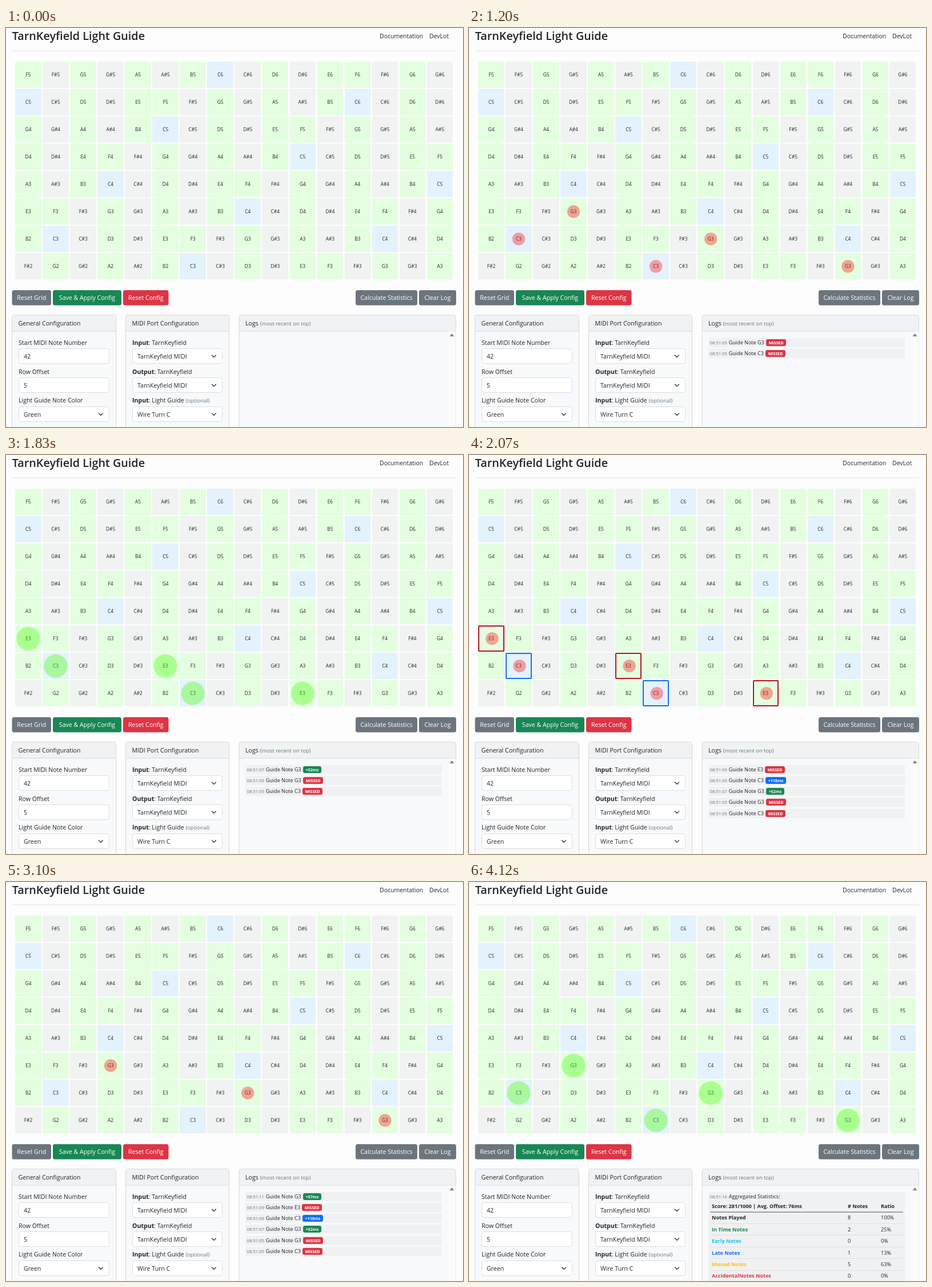
Write an HTML page that moves like this. It is 800 by 700 pixels and loops after 5430 ms.

```html
<!DOCTYPE html>
<html lang="en">
<head>
<meta charset="utf-8">
<title>Light Guide</title>
<style>
  html, body { margin: 0; width: 100%; height: 100%; overflow: hidden; background: #fdfdfd; }
  svg { display: block; width: 800px; height: 700px; font-family: "Open Sans", "Noto Sans", sans-serif; }
</style>
</head>
<body>
<svg id="stage" viewBox="0 0 800 700" xmlns="http://www.w3.org/2000/svg"></svg>
<script>
const NS = 'http://www.w3.org/2000/svg';
const stage = document.getElementById('stage');
const INK = '#212529', MUTED = '#64777d', GREY = '#6c757d';
const GREEN = '#198754', RED = '#dc3545', BLUE = '#0d6efd';
const LOOP = 5430;

function add(parent, tag, attrs, content) {
  const el = document.createElementNS(NS, tag);
  for (const k in attrs) el.setAttribute(k, attrs[k]);
  if (content !== undefined) el.textContent = content;
  parent.appendChild(el);
  return el;
}
const group = (parent) => add(parent, 'g', {});
const rect = (p, x, y, w, h, fill, more) => add(p, 'rect', { x, y, width: w, height: h, fill, ...more });
const text = (p, x, y, str, size = 10.6, fill = INK, more) =>
  add(p, 'text', { x, y, 'font-size': size, fill, ...more }, str);
const aside = (t, str) => add(t, 'tspan', { 'font-size': 9.4, fill: MUTED, dx: 0.6 }, ' ' + str);
const bold = { 'font-weight': 700 };
const middle = { 'text-anchor': 'middle' };
const show = (el, on) => el.setAttribute('visibility', on ? 'visible' : 'hidden');

// Header
text(stage, 10.7, 21, 'TarnKeyfield Light Guide', 19.8, INK, { 'font-weight': 600 });
text(stage, 654, 17.5, 'Documentation', 10.5);
text(stage, 741, 17.5, 'DevLot', 10.5);
rect(stage, 11, 39.5, 777, 1, '#e1e2e3');

// Note grid
const NAMES = ['C', 'C#', 'D', 'D#', 'E', 'F', 'F#', 'G', 'G#', 'A', 'A#', 'B'];
const EDGE = { r: '#b3141e', b: BLUE, g: '#12a82c' };
const PITCH = { C: 48, E: 52, G: 55 };
const STEP = 48.03, SIDE = 45.4;
const marks = [];

function cell(row, col) {
  const midi = 42 + (7 - row) * 5 + col;
  const name = NAMES[midi % 12];
  const fx = 16.2 + STEP * col, fy = 59.1 + STEP * row;
  const x = Math.round(fx), y = Math.round(fy);
  const w = Math.round(fx + SIDE) - x, h = Math.round(fy + SIDE) - y;
  const fill = name === 'C' ? '#e4f2fd' : name.length > 1 ? '#f1f2f2' : '#e4fee0';
  const cx = fx + 22.8, cy = fy + 22.9;
  rect(stage, x, y, w, h, fill, { rx: 1 });
  text(stage, cx, cy + 3.1, name + (Math.floor(midi / 12) - 1), 8.3, INK, middle);
  const key = Object.keys(PITCH).find(k => PITCH[k] === midi);
  if (!key) return;
  const dot = (r, fill, o) => add(stage, 'circle', { cx, cy, r, fill, 'fill-opacity': o });
  marks.push({
    key, cx,
    played: dot(11.2, 'rgb(255,20,20)', 0.38),
    guide: dot(20.6, 'rgb(80,255,20)', 0.4),
    edge: rect(stage, x + 1, y + 1, w - 2, h - 2, 'none', { 'stroke-width': 2, rx: 1 })
  });
}
for (let r = 0; r < 8; r++) for (let c = 0; c < 16; c++) cell(r, c);

// Buttons
function button(x, right, label, fill) {
  rect(stage, x, 460, right - x, 26.6, fill, { rx: 3.5 });
  text(stage, (x + right) / 2, 477.4, label, 10.6, '#fff', middle);
}
button(10.5, 79, 'Reset Grid', GREY);
button(82, 202, 'Save & Apply Config', GREEN);
button(205, 284.6, 'Reset Config', RED);
button(612, 720, 'Calculate Statistics', GREY);
button(723, 788, 'Clear Log', GREY);

// Cards
function card(x, right, title, note) {
  const w = right - x;
  rect(stage, x + .5, 503.5, w - 1, 230, '#f8f9fa', { rx: 4 });
  rect(stage, x + .5, 503.5, w - 1, 28.5, '#f1f2f3', { rx: 4 });
  rect(stage, x, 531.5, w, 1, '#d8d9da');
  rect(stage, x + .5, 503.5, w - 1, 230, 'none', { rx: 4, stroke: '#d8d9da' });
  const t = text(stage, x + 11.5, 522, title);
  if (note) aside(t, note);
}
function field(x, y, w, value, select) {
  rect(stage, x + .5, y + .5, w - 1, 26, '#fff', { rx: 4, stroke: '#dadee2' });
  text(stage, x + 9, y + 17.5, value);
  if (select) add(stage, 'path', {
    d: `M${x + w - 18.6} ${y + 12}l3.5 3.5l3.5 -3.5`, fill: 'none', stroke: '#343a40',
    'stroke-width': 1.3, 'stroke-linecap': 'round', 'stroke-linejoin': 'round'
  });
}
function label(x, y, strong, rest, note) {
  const t = text(stage, x, y, '');
  if (strong) add(t, 'tspan', bold, strong);
  add(t, 'tspan', {}, rest);
  if (note) aside(t, note);
}

card(10, 193, 'General Configuration');
label(22, 556, '', 'Start MIDI Note Number');
field(22, 562, 159, '42');
label(22, 606.7, '', 'Row Offset');
field(22, 613, 159, '5');
label(22, 657.4, '', 'Light Guide Note Color');
field(22, 664, 159, 'Green', true);
label(22, 708, '', 'Played Note Color');

card(209, 391, 'MIDI Port Configuration');
label(221, 556, 'Input', ': TarnKeyfield');
field(221, 562, 158, 'TarnKeyfield MIDI', true);
label(221, 606.7, 'Output', ': TarnKeyfield');
field(221, 613, 158, 'TarnKeyfield MIDI', true);
label(221, 657.4, 'Input', ': Light Guide', '(optional)');
field(221, 664, 158, 'Wire Turn C', true);
label(221, 708, 'Output', ': Light Guide');

card(407.5, 788, 'Logs', '(most recent on top)');
rect(stage, 774, 532.5, 13.5, 170, '#fbfbfb');
add(stage, 'path', { d: 'M776.5 541l4 -5l4 5z', fill: '#a5767b' });

// Log entries, oldest first: second, note, offset
const LOGS = [
  ['05', 'C'], ['05', 'G'], ['07', 'G', 52], ['09', 'C', 118],
  ['09', 'E'], ['11', 'G', 57], ['14', 'C'], ['14', 'G']
];
const BADGE_X = { C: 519, E: 518, G: 520 };
const logTime = (p, y, sec) => text(p, 421.5, y, '08:51:' + sec, 7.7, GREY);

const entries = LOGS.map(([sec, key, ms]) => {
  const g = group(stage);
  const x = BADGE_X[key];
  const w = !ms ? 35 : ms > 99 ? 36 : 32;
  rect(g, 419, 544, 344, 16, '#f0f1f2', { rx: 1 });
  logTime(g, 555.4, sec);
  text(g, 454.7, 555.4, `Guide Note ${key}3`, 9.05);
  rect(g, x, 546, w, 12, !ms ? RED : ms > 99 ? BLUE : GREEN, { rx: 3.3 });
  text(g, x + w / 2, 554.7, ms ? `+${ms}ms` : 'MISSED', 7, '#fff', { ...bold, ...middle });
  return g;
});

// Statistics table
const stats = group(stage);
rect(stats, 419, 544, 344, 160, '#f0f1f2', { rx: 1 });
logTime(stats, 555.4, '16');
text(stats, 454.7, 555.4, 'Aggregated Statistics:', 9.05);
text(stats, 425, 572, 'Score: 281/1000 | Avg. Offset: 76ms', 9.1, INK, bold);
text(stats, 663, 572, '# Notes', 9.1, INK, bold);
text(stats, 721, 572, 'Ratio', 9.1, INK, bold);
rect(stats, 422, 578.6, 338, 1, '#4d5257');
[
  ['Notes Played', 8, 100, INK],
  ['In Time Notes', 2, 25, GREEN],
  ['Early Notes', 0, 0, '#0dcaf0'],
  ['Late Notes', 1, 13, BLUE],
  ['Missed Notes', 5, 63, '#ffc107'],
  ['AccidentalNotes Notes', 0, 0, RED]
].forEach(([name, count, ratio, fill], i) => {
  const y = 592.4 + 20.4 * i;
  text(stats, 425, y, name, 9.1, fill, bold);
  text(stats, 663, y, count, 9.1);
  text(stats, 721, y, ratio + '%', 9.1);
  rect(stats, 422, Math.round(y + 6.6), 338, 1, '#dddfe1');
});

// Cues: start, guide notes, played notes, outlines (note + colour), log length
const CUES = [
  [0, '', '', '', 0],
  [480, 'CG', '', '', 0],
  [660, 'CG', '', 'Cr', 1],
  [720, 'CG', '', 'CrGr', 2],
  [1200, '', 'CG', '', 2],
  [1260, '', '', '', 2],
  [1320, 'G', '', '', 2],
  [1380, 'G', 'G', 'Gg', 3],
  [1650, '', 'G', '', 3],
  [1710, '', '', '', 3],
  [1770, 'CE', '', '', 3],
  [1890, 'CE', 'C', 'Cb', 4],
  [1950, 'CE', 'C', 'CbEr', 5],
  [2010, 'E', 'CE', 'CbEr', 5],
  [2070, '', 'CE', 'CbEr', 5],
  [2190, '', 'CE', 'Er', 5],
  [2310, '', 'CE', '', 5],
  [2680, 'G', 'G', 'Gg', 6],
  [3100, '', 'G', '', 6],
  [3160, '', '', '', 6],
  [3220, 'CG', '', '', 6],
  [3280, 'CG', '', 'Cr', 7],
  [3340, 'CG', '', 'CrGr', 8],
  [3760, 'CG', '', 'Gr', 8],
  [3820, 'CG', '', '', 8],
  [4120, 'CG', '', '', 9]
];

let last;
function render(t) {
  const cue = CUES.findLast(c => c[0] <= t);
  if (cue === last) return;
  last = cue;
  const [, guide, played, edges, count] = cue;
  for (const m of marks) {
    const at = edges.indexOf(m.key);
    const cx = m.cx + (at < 0 ? 0 : 1.5);
    m.guide.setAttribute('cx', cx);
    m.played.setAttribute('cx', cx);
    show(m.guide, guide.includes(m.key));
    show(m.played, played.includes(m.key));
    show(m.edge, at >= 0);
    if (at >= 0) m.edge.setAttribute('stroke', EDGE[edges[at + 1]]);
  }
  const done = count > LOGS.length;
  entries.forEach((g, i) => {
    show(g, i < count && !done);
    g.setAttribute('transform', `translate(0 ${Math.round(19.14 * (count - 1 - i))})`);
  });
  show(stats, done);
}

const start = performance.now();
function tick() {
  render((performance.now() - start) % LOOP);
  requestAnimationFrame(tick);
}
tick();
</script>
</body>
</html>
```
